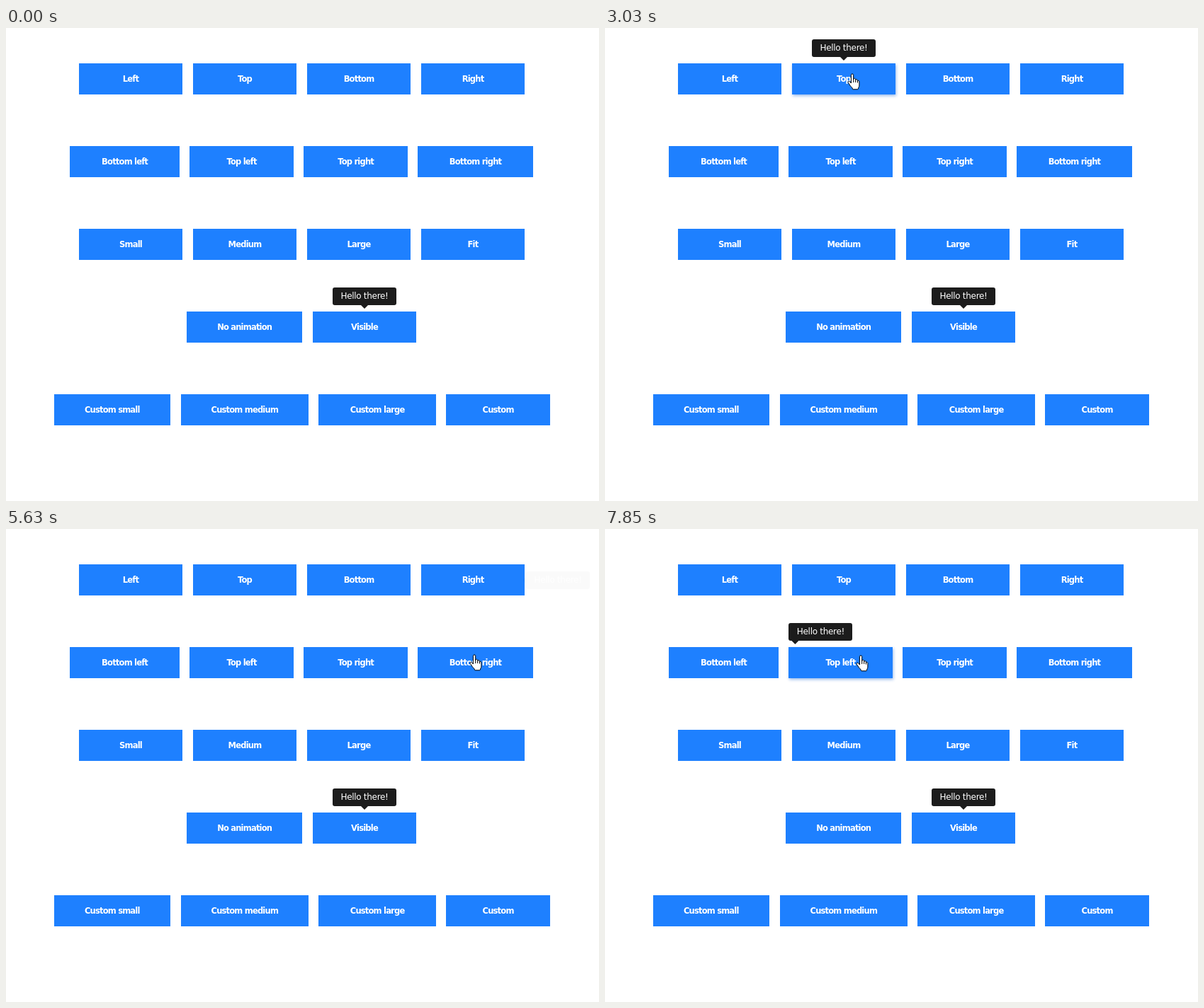
Animation, 837 px wide and 669 px high, one loop 8000 ms. Source, as an HTML page:

```html
<!DOCTYPE html>
<html lang="en">
<head>
<meta charset="utf-8">
<title>Tooltip positions</title>
<style>
html, body { margin: 0; width: 100%; height: 100%; overflow: hidden; background: #fff; }
#stage { position: relative; width: 837px; height: 669px; overflow: hidden; }
.button, .tip, .cursor { position: absolute; }
.button {
  height: 44px; background: #1e80ff; color: #fff; text-align: center; white-space: nowrap;
  font: bold 11.5px/44px "DejaVu Sans", sans-serif; letter-spacing: -.8px;
}
.tip {
  width: 90px; height: 25px; border-radius: 3px; background: #1c1c1c; color: #fff;
  text-align: center; white-space: nowrap;
  font: 12px/25px "DejaVu Sans", sans-serif; letter-spacing: -.3px;
}
.tip::after {
  content: ""; position: absolute; left: var(--arrow); top: 25px; width: 10px; height: 5px;
  margin-left: -5px; background: inherit; clip-path: polygon(0 0, 100% 0, 50% 100%);
}
.tip.bottom::after { top: -5px; clip-path: polygon(0 100%, 100% 100%, 50% 0); }
.tip.left::after, .tip.right::after { top: 7.5px; width: 5px; height: 10px; margin: 0; }
.tip.left::after { left: 90px; clip-path: polygon(0 0, 100% 50%, 0 100%); }
.tip.right::after { left: -5px; clip-path: polygon(100% 0, 0 50%, 100% 100%); }
.cursor { left: 0; top: 0; overflow: visible; fill: #fff; stroke: #000; stroke-linejoin: round; }
</style>
</head>
<body>
<div id="stage"></div>
<script>
const LOOP = 8000, TIP_W = 90, TIP_H = 25, GAP = 9, SLIDE = 7, BUTTON_H = 44;
const stage = document.getElementById("stage");

const rows = [
  [50, [[103, 146, "Left"], [264, 146, "Top"], [425, 146, "Bottom"], [586, 146, "Right"]]],
  [167, [[90.4, 154.4, "Bottom left"], [259.4, 146.4, "Top left"], [420.4, 146.4, "Top right"], [581.2, 162.6, "Bottom right"]]],
  [284, [[103, 146, "Small"], [264, 146, "Medium"], [425, 146, "Large"], [586, 146, "Fit"]]],
  [401, [[255, 163.4, "No animation"], [433, 146, "Visible"]]],
  [518, [[67.5, 164.5, "Custom small"], [247, 179.6, "Custom medium"], [441.4, 165.4, "Custom large"], [621.4, 146.4, "Custom"]]]
];

// Each move: start, end, step length, destination, hovered button
const entry = [222, 8];
const moves = [
  [500, 1100, 75, [217, 61], "Left"],
  [1820, 2330, 82, [349, 65], "Top"],
  [3030, 3510, 80, [505, 67], "Bottom"],
  [4290, 4760, 77, [641, 66], "Right"],
  [5260, 5880, 74, [663, 192], "Bottom right"],
  [6370, 6860, 82, [520, 182], "Top right"],
  [7310, 7850, 77, [361, 179], "Top left"]
].map(([start, end, step, to, name]) => ({ start, end, step, to, name }));

function add(className, text) {
  const el = document.createElement("div");
  el.className = className;
  el.textContent = text;
  stage.append(el);
  return el;
}

function place(el, x, y) {
  el.style.left = x + "px";
  el.style.top = y + "px";
}

const buttons = {};
for (const [y, cells] of rows) {
  for (const [x, w, name] of cells) {
    const el = add("button", name);
    place(el, x, y);
    el.style.width = w + "px";
    buttons[name] = { el, x, y, w };
  }
}

function makeTip(button, position) {
  const [side, align] = position.split(" ");
  const { x, y, w } = button;
  const el = add("tip " + side, "Hello there!");
  let left = x + (w - TIP_W) / 2, top = y + (BUTTON_H - TIP_H) / 2, arrow = TIP_W / 2;
  if (side === "left") left = x - GAP - TIP_W;
  if (side === "right") left = x + w + GAP;
  if (side === "top") top = y - GAP - TIP_H;
  if (side === "bottom") top = y + BUTTON_H + GAP;
  if (align === "left") [left, arrow] = [x, GAP];
  if (align === "right") [left, arrow] = [x + w - TIP_W, TIP_W - GAP];
  place(el, left, Math.round(top));
  el.style.setProperty("--arrow", arrow + "px");
  const toward = { left: [1, 0], right: [-1, 0], top: [0, 1], bottom: [0, -1] }[side];
  return { el, toward };
}

makeTip(buttons.Visible, "top");
for (const move of moves) {
  move.button = buttons[move.name];
  move.tip = makeTip(move.button, move.name.toLowerCase());
}

function makeCursor(shape) {
  stage.insertAdjacentHTML("beforeend", `<svg class="cursor" width="20" height="25">${shape}</svg>`);
  return stage.lastElementChild;
}

const hand = makeCursor(`<path transform="translate(-6.6 -1)" d="M5 14V2.6a1.6 1.6 0 0 1 3.3 0V9.5V8.6
  c0-1.8 3-1.8 3 .2v1c.2-1.6 2.8-1.4 2.8.4v1c.3-1.3 2.4-1 2.4.6V17c0 2.5-1.6 3.5-1.6 5q0 .8-.8.8H7.8
  q-.8 0-.8-.8c0-1.6-2.2-2.8-3.2-4.4L.9 13.4c-1-1.6 1-3 2.4-1.6z
  M8.3 9.5v3.5M11.3 10v3M14.1 11v2.5"/>`);
const arrow = makeCursor(`<path d="M0 0v16l3.7-3.5 2.4 5.6 2.5-1-2.4-5.5H11.3z"/>`);

const clamp = v => Math.max(0, Math.min(1, v));
const ease = v => v * v * (3 - 2 * v);
const ramp = (t, from, length) => ease(clamp((t - from) / length));

// The picture advances in discrete steps while the pointer travels
function stepped(t) {
  const move = moves.find(m => t >= m.start && t < m.end);
  return move ? move.start + Math.floor((t - move.start) / move.step) * move.step : t;
}

function cursorAt(t) {
  let [x, y] = entry;
  for (const { start, end, to } of moves) {
    const p = ramp(t, start, (end - start) * .75);
    x += (to[0] - x) * p;
    y += (to[1] - y) * p;
  }
  return [x, y];
}

function draw(time) {
  const t = stepped(time % LOOP);
  moves.forEach((move, i) => {
    const leave = moves[i + 1] ? moves[i + 1].start : Infinity;
    const shown = ramp(t, move.end - 160, 160) * (1 - ramp(t, leave + 240, 140));
    const lift = ramp(t, move.end - 200, 160) * (1 - ramp(t, leave + 170, 140));
    const [dx, dy] = move.tip.toward.map(d => d * SLIDE * (1 - shown));
    move.tip.el.style.opacity = shown;
    move.tip.el.style.transform = `translate(${dx}px, ${dy}px)`;
    move.button.el.style.boxShadow = `1px 2px 4px rgba(30, 105, 210, ${.45 * lift})`;
  });

  const [x, y] = cursorAt(t);
  const over = Object.values(buttons).some(b => x >= b.x && x < b.x + b.w && y >= b.y && y < b.y + BUTTON_H);
  const present = t >= moves[0].start;
  hand.style.visibility = present && over ? "visible" : "hidden";
  arrow.style.visibility = present && !over ? "visible" : "hidden";
  for (const el of [hand, arrow]) el.style.transform = `translate(${Math.round(x)}px, ${Math.round(y)}px)`;
}

const begun = performance.now();
function tick() {
  draw(performance.now() - begun);
  requestAnimationFrame(tick);
}
tick();
</script>
</body>
</html>
```
